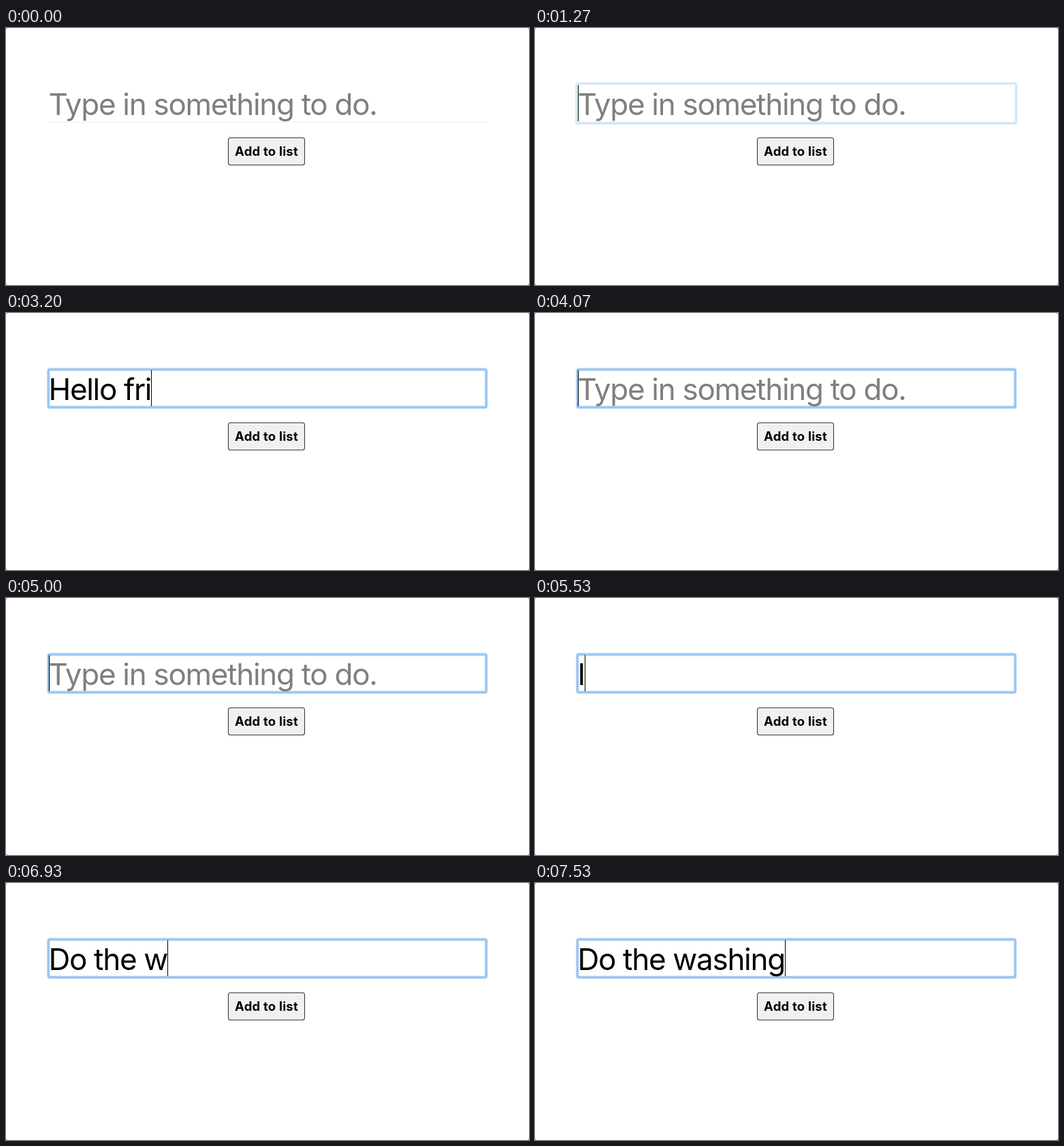
An HTML page with a canvas that plays this animation: 768 px wide and 378 px high, repeating every 8 s.

```html
<!DOCTYPE html>
<html lang="en">
<head>
<meta charset="utf-8">
<title>To-do input</title>
<style>
  html, body { margin: 0; width: 100%; height: 100%; overflow: hidden; background: #fff; }
  #stage { position: relative; width: 768px; height: 378px; overflow: hidden; }
  canvas { position: absolute; left: 0; top: 0; }
  .text {
    position: absolute;
    white-space: pre;
    font-family: Inter, "Liberation Sans", sans-serif;
    font-optical-sizing: none;
  }
  #line { left: 62.5px; top: 86px; font-size: 44px; line-height: 52px; letter-spacing: -1.3px; color: #000; }
  #hint { color: #7f7f7f; }
  #caret { position: absolute; top: -2px; width: 1px; height: 53px; background: #000; }
  #button { left: 326px; top: 170px; width: 113px; text-align: center; font-size: 18.5px; font-weight: 700; line-height: 22px; letter-spacing: .2px; color: #000; }
</style>
</head>
<body>
<div id="stage">
  <canvas id="shapes" width="768" height="378"></canvas>
  <div id="line" class="text"><span id="typed"></span><span id="caret"></span><span id="hint">Type in something to do.</span></div>
  <div id="button" class="text">Add to list</div>
</div>
<script>
  const LOOP = 8000, FOCUS = 1270, BLINK_OFF = 4465, BLINK_ON = 4995;

  // [time, field value]
  const keys = [
    [0, ""], [1530, "H"], [1930, "He"], [2070, "Hel"], [2330, "Hell"],
    [2530, "Hello"], [2670, "Hello "], [3000, "Hello f"], [3130, "Hello fr"],
    [3200, "Hello fri"], [3400, "Hello frie"], [3470, "Hello frien"],
    [3530, "Hello friend"], [3930, ""], [5070, "I"], [5130, "I "],
    [5530, "I"], [5730, ""], [6000, "D"], [6130, "Do"], [6200, "Do "],
    [6400, "Do t"], [6530, "Do the"], [6600, "Do the "], [6930, "Do the w"],
    [7000, "Do the wa"], [7130, "Do the was"], [7330, "Do the wash"],
    [7470, "Do the washin"], [7530, "Do the washing"]
  ];

  const el = id => document.getElementById(id);
  const typed = el("typed"), caret = el("caret"), hint = el("hint");
  const ctx = el("shapes").getContext("2d");

  function box(x, y, w, h, r) {
    ctx.beginPath();
    ctx.roundRect(x, y, w, h, r);
  }

  function drawPage() {
    ctx.fillStyle = "#8a8a8a";
    ctx.fillRect(0, 0, 768, 378);
    ctx.fillStyle = "#fff";
    box(0, 0, 768, 378, 3);
    ctx.fill();

    ctx.fillStyle = "#ececec";
    ctx.fillRect(62, 138, 642, 1);

    ctx.fillStyle = "#f0f0f0";
    ctx.strokeStyle = "#3a3a3a";
    ctx.lineWidth = 1.1;
    box(326.5, 161.5, 112, 40, 3);
    ctx.fill();
    ctx.stroke();
  }

  // The focus ring closes in and fades up.
  function drawRing(p) {
    const grow = 2 * (1 - p);
    ctx.globalAlpha = p;
    for (const [width, color] of [[5, "#d2e6f9"], [3, "#98c5f0"]]) {
      ctx.lineWidth = width;
      ctx.strokeStyle = color;
      box(62.3 - grow, 83 - grow, 642.9 + 2 * grow, 55.8 + 2 * grow, 2);
      ctx.stroke();
    }
    ctx.globalAlpha = 1;
  }

  function render(t) {
    const value = keys.findLast(k => k[0] <= t)[1];
    const focused = t >= FOCUS;
    const blinkedOff = t >= BLINK_OFF && t < BLINK_ON;

    typed.textContent = value;
    hint.style.visibility = value ? "hidden" : "visible";
    caret.style.visibility = focused && !blinkedOff ? "visible" : "hidden";

    drawPage();
    if (focused) drawRing(Math.min(1, (Math.floor((t - FOCUS) / 66) + 1) / 3));
  }

  const start = performance.now();
  function tick() {
    render((performance.now() - start) % LOOP);
    requestAnimationFrame(tick);
  }
  tick();
</script>
</body>
</html>
```
